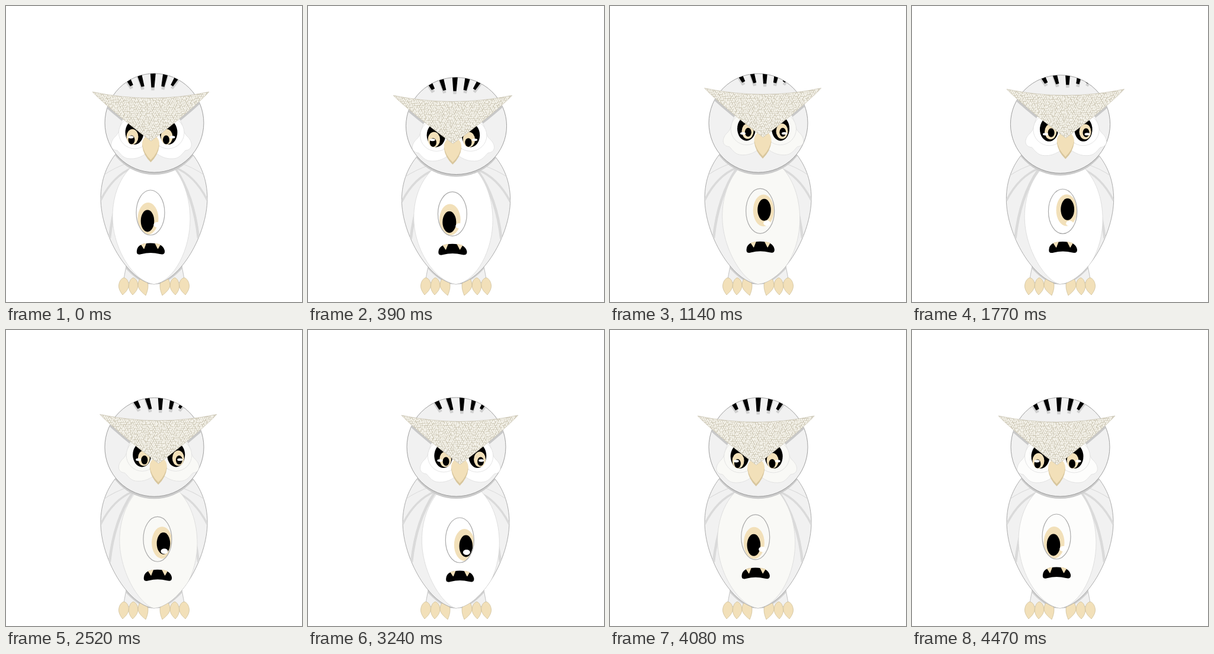
An HTML page that plays this animation: 500 by 500 pixels, repeating every 4.5 s.

```html
<!DOCTYPE html>
<html lang="en">
<head>
<meta charset="utf-8">
<title>Owl</title>
<style>
html, body { margin: 0; width: 100%; height: 100%; overflow: hidden; background: #fff; }
svg { display: block; width: 100%; height: 100%; }
.plume { fill: var(--plume); }
</style>
</head>
<body>
<svg viewBox="0 0 500 500">
  <defs>
    <clipPath id="headClip"><circle cx="250.5" cy="197.5" r="83.5"/></clipPath>
    <clipPath id="bodyClip"><use href="#bodyShape"/></clipPath>
    <clipPath id="browClip"><use href="#browShape"/></clipPath>
    <clipPath id="eyeClip"><ellipse cx="244" cy="349" rx="23.4" ry="37.4"/></clipPath>
    <path id="bodyShape" d="M250 470C205 465 160 385 160 325C160 293 171 267 187 248H313C329 267 340 293 340 325C340 385 295 465 250 470Z"/>
    <path id="browShape" d="M146 145Q245 166 343 145C325 165 275 206 245 228C215 206 165 165 146 145Z"/>
    <g id="wing" fill="none" stroke="#dadada">
      <path d="M210 264Q184 272 163 287" stroke-width="1"/>
      <path d="M214 273C192 282 174 300 160 328" stroke-width="3.5"/>
      <path d="M214 275C194 304 180 345 175 392" stroke-width="4.5"/>
    </g>
    <g id="leg">
      <path d="M204 434L198 466L240 472Z" fill="#f1f1f1" stroke="#aaa" stroke-width=".7"/>
      <path d="M203 437L202 443Q222 465 240 470L250 469Z" fill="#cfcfcf"/>
      <g fill="#f2e0b9" stroke="#cbbb94" stroke-width=".7">
        <path d="M199 459C205 460 208 467 207 474C205 481 201 484 197 488C193 483 190 477 190.500 472C191 465 195 460 199 459Z"/>
        <path d="M215 459C220 460 223 467 223 473C222 480 218 484 214 488C209 483 207 477 207.500 472C208 465 211 460 215 459Z"/>
        <path d="M230 459C235 459 239 465 240 472C240 479 238 484 236 489C230 484 224 479 223 472C223 465 226 460 230 459Z"/>
      </g>
    </g>
    <path id="cheek" d="M245 190H292C300 198 297 213 307 221C316 230 316 243 303 244C297 250 293 258 281 258C265 259 251 248 245 240Z"/>
    <path id="beakShape" d="M230 236Q231 223 245 222Q258 223 259 236Q257 252 244.500 264Q232 252 230 236Z"/>
    <path id="tufts" stroke-width="1.200" d="M196 113L204 109L214 133L210 135ZM219 108H227L233 135L229 136ZM244 105H253L250 137H246ZM267 106L275 108L267 136L263 135ZM291 109L298 113L282 135L279 133Z"/>
  </defs>

  <use href="#leg"/>
  <use href="#leg" transform="matrix(-1 0 0 1 500 0)"/>

  <g id="owl">
    <use href="#bodyShape" fill="#f1f1f1" stroke="#999" stroke-width=".8"/>
    <g clip-path="url(#bodyClip)">
      <use href="#wing"/>
      <use href="#wing" transform="matrix(-1 0 0 1 500 0)"/>
      <path id="belly" class="plume" stroke="#d8d8d8" stroke-width=".8"/>
      <circle cx="250.500" cy="201.500" r="83.500" fill="#cbcbcb"/>
    </g>

    <g id="chest">
      <ellipse class="plume" cx="244" cy="349" rx="24" ry="38"/>
      <g clip-path="url(#eyeClip)">
        <ellipse id="chestIris" cx="240" cy="359" rx="17.500" ry="27" fill="#f2e0b9"/>
        <ellipse id="chestPupil" cx="239" cy="363" rx="11.300" ry="18.500"/>
        <ellipse cx="255.500" cy="369.500" rx="6" ry="4.500" fill="#fff"/>
      </g>
      <ellipse cx="244" cy="349" rx="24" ry="38" fill="none" stroke="#aaa" stroke-width="1.200"/>
      <path d="M221 413C222 404 231 400.500 244 400.500C257 400.500 266 404 268 413C269 420 264 420 260 419Q244 415 229 419C224 420.500 220 420 221 413Z"/>
      <path d="M228.500 403L233 410L236.500 401ZM252 401L256.500 410L260.500 403Z" fill="#f2e0b9" stroke="#f2e0b9" stroke-linejoin="round"/>
    </g>

    <circle cx="250.500" cy="197.500" r="83.500" fill="#f1f1f1" stroke="#888" stroke-width=".8"/>
    <g clip-path="url(#headClip)">
      <g class="face">
        <use href="#tufts" y="5" fill="#cfcfcf" stroke="#cfcfcf"/>
        <use href="#tufts" stroke="#000"/>
        <use href="#browShape" y="5" fill="#c8c8c8"/>
        <g class="plume" stroke="#dedede" stroke-width=".8">
          <use href="#cheek"/>
          <use href="#cheek" transform="matrix(-1 0 0 1 491 0)"/>
          <circle cx="217.500" cy="214" r="27"/>
          <circle cx="274" cy="214" r="27"/>
        </g>
        <ellipse cx="217" cy="213.500" rx="15.500" ry="20.500"/>
        <ellipse cx="274.500" cy="213.500" rx="15" ry="20.500"/>
        <g id="irises" fill="#f2e0b9">
          <ellipse cx="213.500" cy="221" rx="10" ry="13"/>
          <ellipse cx="271.500" cy="221" rx="10" ry="13"/>
        </g>
        <g id="pupils">
          <ellipse cx="212" cy="226" rx="5.500" ry="7.500"/>
          <ellipse cx="270.500" cy="226" rx="5.500" ry="7.500"/>
        </g>
        <g fill="#fff">
          <ellipse cx="211" cy="221.500" rx="4.500" ry="2.200"/>
          <ellipse cx="281" cy="221.500" rx="4.500" ry="2.200"/>
        </g>
      </g>
    </g>
    <g class="face">
      <use href="#beakShape" fill="#d8c69d"/>
      <use href="#beakShape" y="-4" fill="#f2e0b9"/>
      <use href="#browShape" fill="#d0cbba"/>
      <path id="pebbles" clip-path="url(#browClip)" fill="none" stroke="#f6f4ec" stroke-width="2.700" stroke-linecap="round"/>
      <use href="#browShape" fill="none" stroke="#c9c3b2" stroke-width=".7"/>
    </g>
  </g>
</svg>
<script>
const LOOP = 4500, STEP = 1500;
const $ = id => document.getElementById(id);
const faces = document.querySelectorAll('.face');

// Offsets for three gazes: down left, up right, down right
const poses = {
  face: [[0, 0], [14.7, -7], [11.8, -1]],
  irises: [[0, 0], [6, -3.5], [6.8, -1.5]],
  pupils: [[0, 0], [8.5, -7], [9.3, -3]],
  chest: [[0, 0], [10.6, -3], [12.3, 6]],
  chestIris: [[0, 0], [10.5, -12], [12, -2]],
  chestPupil: [[0, 0], [13, -17.5], [15.5, -4]]
};

const clamp = v => Math.max(0, Math.min(1, v));
const easeInOut = u => (1 - Math.cos(Math.PI * u)) / 2;
const easeOut = u => 1 - (1 - u) ** 3;
const move = (el, [x, y]) => el.setAttribute('transform', `translate(${x} ${y})`);

let seed = 7;
const random = () => (seed = seed * 16807 % 2147483647) / 2147483647;

function scatterPebbles() {
  let d = '', row = 0;
  for (let y = 144; y < 230; y += 3.2, row++)
    for (let x = 144 + row % 2 * 1.8; x < 345; x += 3.6)
      d += `M${(x + random() * 1.2).toFixed(1)} ${(y + random() * 1.2).toFixed(1)}l${(random() - .5).toFixed(1)} .3`;
  $('pebbles').setAttribute('d', d);
}

function squash(p) {
  if (p < 245) return 0;
  if (p < 690) return .02 * (1 - Math.exp((245 - p) / 55));
  return .02 * Math.exp((690 - p) / 120);
}

function draw(time) {
  const t = time % LOOP, k = Math.floor(t / STEP), p = t % STEP;
  const turn = easeInOut(clamp((p - 650) / 600));
  const glide = clamp((p - 690) / 810), drift = easeOut(glide);
  const at = (name, u) => {
    const from = poses[name][k], to = poses[name][(k + 1) % 3];
    return from.map((v, i) => v + (to[i] - v) * u);
  };

  const s = squash(p);
  $('owl').setAttribute('transform', `translate(250 470) scale(${1 + s} ${1 - s}) translate(-250 -470)`);

  const facePos = at('face', turn);
  faces.forEach(el => move(el, facePos));
  for (const name of ['irises', 'pupils', 'chest', 'chestIris', 'chestPupil']) move($(name), at(name, drift));

  const tint = clamp(3 * Math.sin(Math.PI * glide));
  $('owl').style.setProperty('--plume', `rgb(${255 - 6 * tint},${255 - 6 * tint},${255 - 9 * tint})`);

  const x = at('chest', drift)[0];
  $('belly').setAttribute('d', `M250 470C${215 + x} 465 ${180 + x} 410 ${180 + x} 355` +
    `C${180 + x} 320 ${193 + x} 287 ${216 + x * .8} 268H${278 + x * .8}` +
    `C${300 + x} 290 ${311 + x} 325 ${311 + x} 360C${311 + x} 410 ${285 + x} 465 250 470Z`);
}

function frame() {
  draw(performance.now());
  requestAnimationFrame(frame);
}

scatterPebbles();
frame();
</script>
</body>
</html>
```
